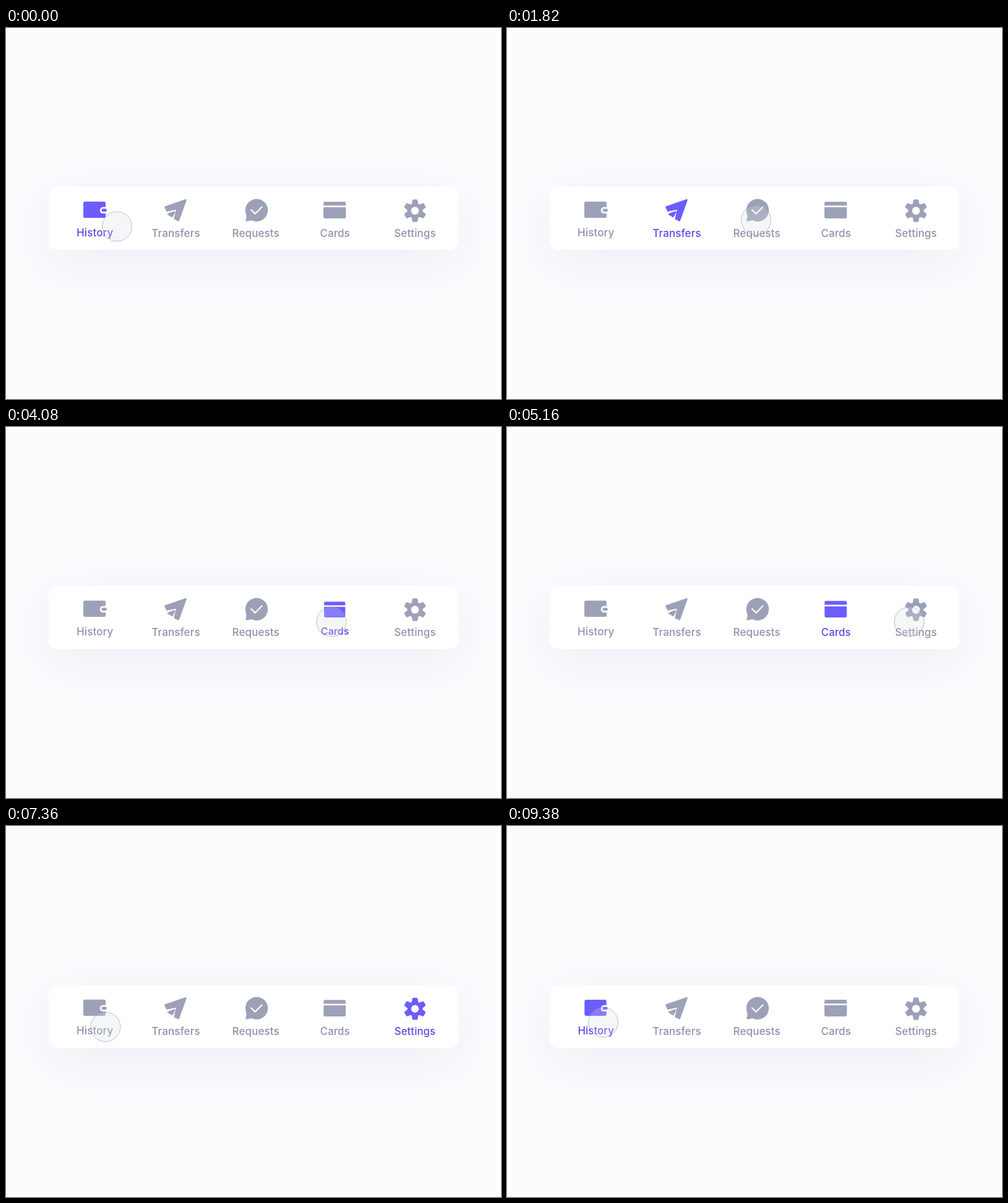
Write an HTML page that moves like this. It is 800 by 600 pixels and loops after 9.4 s.

```html
<!DOCTYPE html>
<html lang="en">
<head>
<meta charset="utf-8">
<title>Tab bar</title>
<style>
  html, body { margin: 0; width: 100%; height: 100%; overflow: hidden; background: #fafcfe; }
  #stage { position: relative; width: 800px; height: 600px; overflow: hidden; }
  #bar {
    position: absolute; left: 69px; top: 256.5px; width: 662px; height: 102px;
    border-radius: 14px; background: #fff; box-shadow: 0 20px 88px rgba(50, 45, 105, .066);
  }
  svg { position: absolute; left: 0; top: 0; }
  text { font: 500 17px Inter, sans-serif; letter-spacing: .1px; text-anchor: middle; }
  .icon { fill: currentColor; }
  .cut { fill: #fff; }
  .line { fill: none; stroke: #fff; stroke-width: 2.2; stroke-linecap: round; stroke-linejoin: round; }
  .soft { stroke: currentColor; stroke-width: 3; stroke-linejoin: round; }
</style>
</head>
<body>
<div id="stage">
  <div id="bar"></div>
  <svg width="800" height="600" viewBox="0 0 800 600">
    <g class="tab">
      <g class="icon">
        <rect x="125" y="280.7" width="36" height="26.3" rx="2.5"/>
        <rect class="cut" x="151.7" y="289.5" width="14" height="10.4" rx="5.2"/>
        <rect x="154.5" y="292.3" width="8.3" height="4.8" rx="2"/>
      </g>
      <text x="143.7" y="337">History</text>
    </g>
    <g class="tab">
      <g class="icon">
        <path class="soft" d="M257.7 289.7L290.3 278.3L278.6 311L273 308.4L276.8 291.8L260.3 295.4Z"/>
        <path d="M260 301.2Q266 297 272.6 296.2Q273.6 296.2 273.5 297.4Q272 302 268.6 306.6Z"/>
      </g>
      <text x="274.5" y="338">Transfers</text>
    </g>
    <g class="tab">
      <g class="icon">
        <circle cx="405" cy="294.7" r="18.2"/>
        <path d="M387.5 299Q389.7 305 387.2 311Q387 312.8 389 312.6Q394 312 397.5 310.6L405 305Z"/>
        <path class="line" d="M396.2 294.2L402.7 300.4L413.7 289.2"/>
      </g>
      <text x="403.7" y="338">Requests</text>
    </g>
    <g class="tab">
      <g class="icon">
        <rect x="513" y="280.9" width="36.3" height="27" rx="2.3"/>
        <rect class="cut" x="512" y="287.2" width="39" height="2.6"/>
      </g>
      <text x="531.7" y="338">Cards</text>
    </g>
    <g class="tab">
      <g class="icon" id="gear" transform="translate(661 295.5)">
        <circle r="9.3" fill="none" stroke="currentColor" stroke-width="6"/>
      </g>
      <text x="661" y="338">Settings</text>
    </g>
    <circle id="touch" r="24" fill="rgba(215,220,226,.25)" stroke="rgba(140,143,158,.55)"/>
  </svg>
</div>
<script>
const LOOP = 9400, FADE = 160, PRESS = 520;
const centers = [143.7, 274.5, 404.5, 531.4, 661];
const clicks = [8500, 350, 1960, 3790, 5290];
const rest = [.985, 1, 1, .985, .985];   // scale kept by a tab after its press
const iconOff = [157, 161, 184], iconOn = [108, 93, 255];
const textOff = [143, 146, 170], textOn = [88, 74, 226];

// start, end, from x, from y, to x, to y, downward bow
const moves = [
  [-174, 426, 155.5, 317.5, 279, 313, 7],
  [1330, 1930, 279, 313, 406, 310.5, 0],
  [2940, 3540, 406, 310.5, 526, 315, 0],
  [4524, 5124, 526, 315, 650, 315, 0]
];
const sweep = { start: 5690, end: 7660, x: [650, 470, 250.5, 155.5], y: [315, 455, 454.5, 317.5] };

const clamp = v => Math.min(1, Math.max(0, v));
const mix = (a, b, p) => a + (b - a) * p;
const blend = (a, b, p) => `rgb(${a.map((v, i) => Math.round(mix(v, b[i], p)))})`;
const cubic = ([a, b, c, d], t) => {
  const s = 1 - t;
  return s * s * s * a + 3 * s * s * t * b + 3 * s * t * t * c + t * t * t * d;
};

function ease(u) {
  let lo = 0, hi = 1;
  for (let i = 0; i < 24; i++) {
    const mid = (lo + hi) / 2;
    if (cubic([0, .5, .3, 1], mid) < u) lo = mid; else hi = mid;
  }
  return cubic([0, 0, 1, 1], lo);
}

function touchAt(t) {
  if (t >= sweep.start) {
    const p = ease(clamp((t - sweep.start) / (sweep.end - sweep.start)));
    return [cubic(sweep.x, p), cubic(sweep.y, p)];
  }
  const [start, end, x0, y0, x1, y1, bow] = moves.filter(m => m[0] <= t).pop();
  const p = ease(clamp((t - start) / (end - start)));
  return [mix(x0, x1, p), mix(y0, y1, p) + bow * 4 * p * (1 - p)];
}

const fadeIn = (t, at) => clamp((t - at) / FADE);

function activeAt(i, t) {
  if (i === 0) return t < clicks[0] ? 1 - fadeIn(t, clicks[1]) : fadeIn(t, clicks[0]);
  return fadeIn(t, clicks[i]) - fadeIn(t, clicks[(i + 1) % 5]);
}

function scaleAt(i, t) {
  const p = clamp((t - clicks[i]) / PRESS);
  const back = i ? clamp((t - clicks[0]) / PRESS) : 0;
  return mix(mix(1, rest[i], p), 1, back) - .05 * Math.sin(Math.PI * p);
}

const gear = document.getElementById('gear');
for (let a = 0; a < 360; a += 60)
  gear.insertAdjacentHTML('beforeend',
    `<path d="M-5.6 -9L-4.4 -16.6Q-4.1 -18.2 -2.5 -18.2H2.5Q4.1 -18.2 4.4 -16.6L5.6 -9Z" transform="rotate(${a})"/>`);

const tabs = [...document.querySelectorAll('.tab')].map(el => ({
  el, icon: el.querySelector('.icon'), label: el.querySelector('text')
}));
const touch = document.getElementById('touch');

function draw(t) {
  tabs.forEach(({ el, icon, label }, i) => {
    const on = activeAt(i, t), x = centers[i];
    icon.style.color = blend(iconOff, iconOn, on);
    label.style.fill = blend(textOff, textOn, on);
    el.setAttribute('transform',
      `translate(${x} 308) scale(${scaleAt(i, t)}) translate(${-x} -308)`);
  });
  const [x, y] = touchAt(t);
  touch.setAttribute('cx', x);
  touch.setAttribute('cy', y);
}

const begin = performance.now();
function tick() {
  draw((performance.now() - begin) % LOOP);
  requestAnimationFrame(tick);
}
tick();
</script>
</body>
</html>
```
